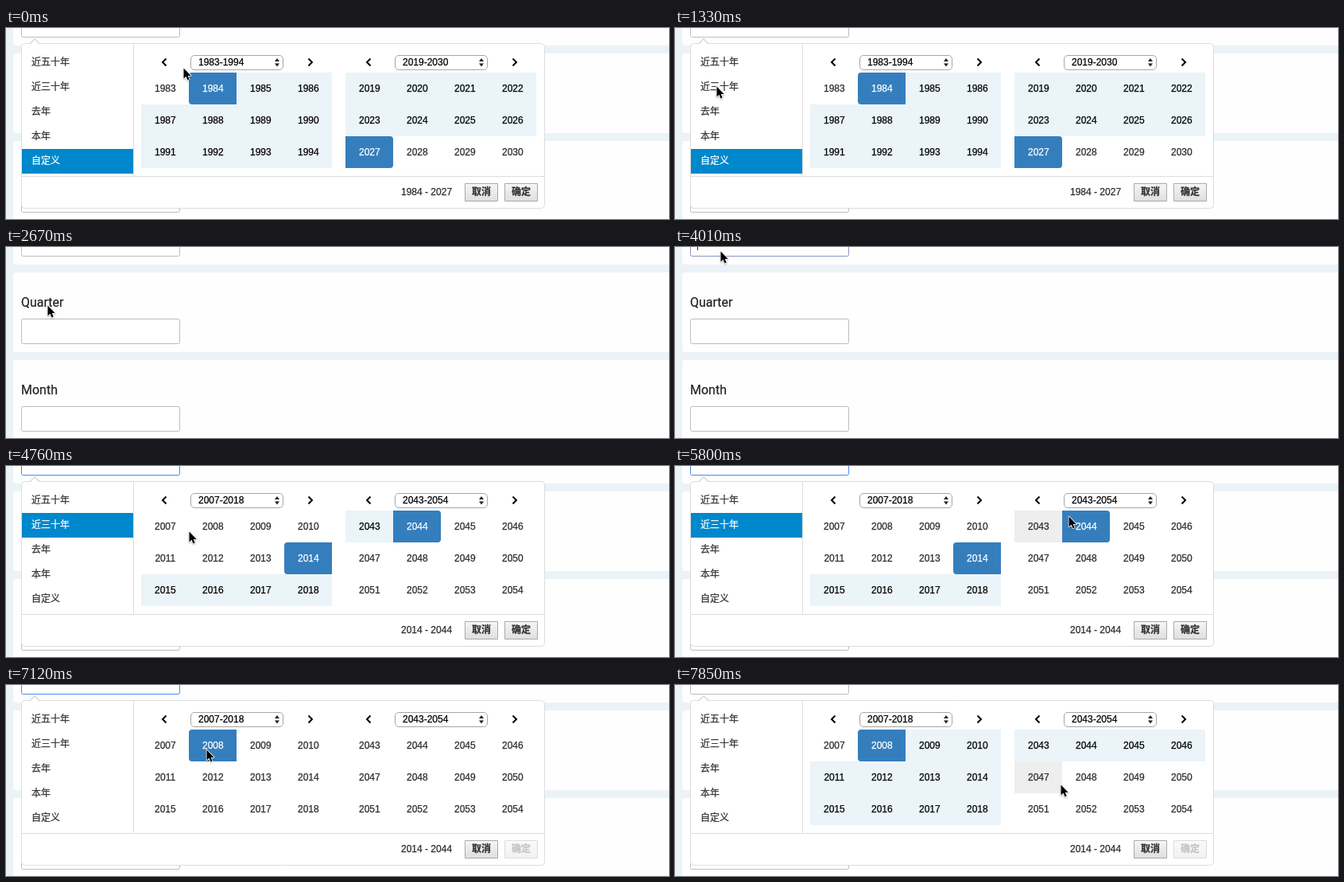
Write an HTML page with a canvas that moves like this. It is 834 by 240 pixels and loops after 8 s.

```html
<!DOCTYPE html>
<html lang="en">
<head>
<meta charset="utf-8">
<title>Year range picker</title>
<style>
html, body { margin: 0; width: 100%; height: 100%; overflow: hidden; background: #ebf3f6; }
canvas { display: block; }
</style>
</head>
<body>
<canvas id="stage" width="834" height="240"></canvas>
<script>
const ctx = document.getElementById('stage').getContext('2d');
const LOOP = 8000, TICK = 148.1, LAST = 53;
const CLOSE = 17, FOCUS = 27, OPEN = 28, PICK = 46, BLUR = 49;
const SANS = '12px "Liberation Sans", Arial, sans-serif';
const CJK = '12px "Noto Sans CJK SC", "Noto Sans CJK", sans-serif';
const MENU = ['近五十年', '近三十年', '去年', '本年', '自定义'];
const CAL_X = [170, 427], CAL_Y = 56, CELL_W = 60, CELL_H = 40;
const ARROW = new Path2D('M0 0V13L3 10.2L5 14.9L7.2 14L5.2 9.4H9.2Z');

// Pointer moves, each from where the last one stopped
const HOME = { x: 223, y: 50 };
const MOVES = [
  { from: 0, to: 9, x: 52, y: 73, bend: 70 },
  { from: 22, to: FOCUS, x: 57, y: 5, bend: 0 },
  { from: OPEN, to: 37, x: 471, y: 73, bend: 50 },
  { from: 38, to: 39, x: 495, y: 63, bend: 0 },
  { from: 39, to: 40, x: 590, y: 68, bend: 0 },
  { from: 40, to: 44, x: 252, y: 81, bend: 0 },
  { from: 48, to: LAST, x: 485, y: 125, bend: 15 }
];

const clamp01 = v => Math.max(0, Math.min(1, v));
const smooth = u => u * u * (3 - 2 * u);

function pointer(tick) {
  let { x, y } = HOME;
  for (const m of MOVES) {
    const u = smooth(clamp01((tick - m.from) / (m.to - m.from)));
    x += (m.x - x) * u;
    y += (m.y - y) * u + m.bend * Math.sin(Math.PI * u);
  }
  return { x: Math.round(x), y: Math.round(y) };
}

function stateAt(tick) {
  if (tick < CLOSE) {
    return { open: true, pages: [1983, 2019], from: 1984, to: 2027,
             menu: tick < CLOSE - 1 ? 4 : 1, label: '1984 - 2027' };
  }
  const picking = tick >= PICK;
  return { open: tick >= OPEN, pages: [2007, 2043], from: picking ? 2008 : 2014,
           to: picking ? null : 2044, menu: picking ? -1 : 1,
           label: '2014 - 2044', picking };
}

// Year under a point, or null
function yearAt({ x, y }, pages) {
  const row = Math.floor((y - CAL_Y) / CELL_H);
  if (row < 0 || row > 2) return null;
  for (let i = 0; i < 2; i++) {
    const col = Math.floor((x - CAL_X[i]) / CELL_W);
    if (col >= 0 && col < 4) return pages[i] + row * 4 + col;
  }
  return null;
}

function rect(x, y, w, h, fill) {
  ctx.fillStyle = fill;
  ctx.fillRect(x, y, w, h);
}

function box(x, y, w, h, r, fill, stroke) {
  const o = stroke ? 0.5 : 0;
  ctx.beginPath();
  ctx.roundRect(x + o, y + o, w - 2 * o, h - 2 * o, r);
  ctx.fillStyle = fill;
  ctx.fill();
  if (stroke) {
    ctx.strokeStyle = stroke;
    ctx.lineWidth = 1;
    ctx.stroke();
  }
}

// A hairline stroke gives the slightly heavier smoothed type
function text(str, x, y, color, font = SANS, align = 'left') {
  ctx.font = font;
  ctx.textAlign = align;
  ctx.fillStyle = ctx.strokeStyle = color;
  ctx.lineWidth = 0.25;
  ctx.fillText(str, x, y);
  ctx.strokeText(str, x, y);
}

// Triangle on a flat base; negative height points up
function triangle(x, base, half, height, fill) {
  ctx.beginPath();
  ctx.moveTo(x - half, base);
  ctx.lineTo(x, base + height);
  ctx.lineTo(x + half, base);
  ctx.fillStyle = fill;
  ctx.fill();
}

function chevron(x, dir) {
  ctx.beginPath();
  ctx.moveTo(x - 2.5 * dir, 38.5);
  ctx.lineTo(x + 2 * dir, 43);
  ctx.lineTo(x - 2.5 * dir, 47.5);
  ctx.strokeStyle = '#000';
  ctx.lineWidth = 2;
  ctx.stroke();
}

function drawPage(tick) {
  rect(0, 0, 834, 240, '#ebf3f6');
  const focused = tick >= FOCUS && tick < BLUR;
  const focusColor = tick === FOCUS ? '#8796c0' : '#4a8cec';
  ['', 'Quarter', 'Month'].forEach((label, i) => {
    const y = 110 * i - 78;
    box(9, y, 840, 100, 4, '#fefefe');
    box(19, y + 58, 200, 32, 2, '#fff', i === 0 && focused ? focusColor : '#bcbcc4');
    text(label, 19, y + 43, '#212529', '16px Roboto, sans-serif');
  });
  const caretOn = Math.floor((tick - FOCUS) * TICK / 493) % 2 === 0;
  if (focused && tick < PICK && caretOn) rect(28, 0, 1, 4, '#222');
}

function drawCalendar(x, first, s, hover) {
  chevron(x + 29, -1);
  chevron(x + 213, 1);
  box(x + 62, 34, 117, 19, 4.5, '#fff', '#a6a6a6');
  text(first + '-' + (first + 11), x + 72, 47, '#000');
  triangle(x + 171, 42, 3, -4, '#222');
  triangle(x + 171, 44.5, 3, 4, '#222');

  const end = s.to || hover;
  for (let i = 0; i < 12; i++) {
    const year = first + i;
    const cx = x + (i % 4) * CELL_W, cy = CAL_Y + Math.floor(i / 4) * CELL_H;
    let color = '#2b2b2b';
    if (year === s.from || year === s.to) {
      const radii = year === s.from ? [4, 0, 0, 4] : [0, 4, 4, 0];
      box(cx, cy, CELL_W, CELL_H, radii, '#357ebd');
      color = '#fff';
    } else if (year === hover) {
      rect(cx, cy, CELL_W, CELL_H, '#eee');
    } else if (year > s.from && year < end) {
      rect(cx, cy, CELL_W, CELL_H, '#ebf4f8');
      color = '#000';
    }
    text(year, cx + CELL_W / 2 + 0.3, cy + 24, color, SANS, 'center');
  }
}

function drawButton(x, label, disabled) {
  const g = ctx.createLinearGradient(0, 195, 0, 218);
  g.addColorStop(0, disabled ? '#fafafa' : '#f6f6f6');
  g.addColorStop(1, disabled ? '#f1f1f1' : '#dedede');
  box(x, 195, 42, 23, 0, g, disabled ? '#ddd' : '#aaa');
  text(label, x + 21, 210, disabled ? '#c4c4c4' : '#333', 'bold ' + CJK, 'center');
}

function drawPopup(s, hover) {
  box(19, 19, 659, 208, 4, '#fff', '#ddd');
  triangle(36, 20, 7, -7, '#ccc');
  triangle(36, 20.5, 6, -6, '#fff');
  MENU.forEach((item, i) => {
    const y = 28 + i * 31, on = i === s.menu;
    if (on) rect(20, y, 140, 31, '#08c');
    text(item, 32, y + 19, on ? '#fff' : '#333', CJK);
  });
  rect(160, 20, 1, 166, '#ddd');
  rect(20, 186, 657, 1, '#ddd');
  s.pages.forEach((first, i) => drawCalendar(CAL_X[i], first, s, hover));
  text(s.label, 497, 210, '#2b2b2b');
  drawButton(577, '取消', false);
  drawButton(627, '确定', s.picking);
}

function drawPointer({ x, y }) {
  ctx.save();
  ctx.translate(x + 0.5, y + 0.5);
  ctx.lineJoin = 'round';
  ctx.lineWidth = 1.6;
  ctx.strokeStyle = '#fff';
  ctx.shadowColor = 'rgba(0,0,0,0.3)';
  ctx.shadowBlur = 2;
  ctx.shadowOffsetY = 1;
  ctx.stroke(ARROW);
  ctx.shadowColor = 'transparent';
  ctx.fillStyle = '#000';
  ctx.fill(ARROW);
  ctx.restore();
}

function draw(ms) {
  const tick = Math.min(LAST, Math.floor((ms % LOOP + 4) / TICK));
  const s = stateAt(tick);
  drawPage(tick);
  // Hover trails the pointer by one tick
  if (s.open) drawPopup(s, yearAt(pointer(tick - 1), s.pages));
  drawPointer(pointer(tick));
}

const start = performance.now();
function loop() {
  draw(performance.now() - start);
  requestAnimationFrame(loop);
}
loop();
</script>
</body>
</html>
```
